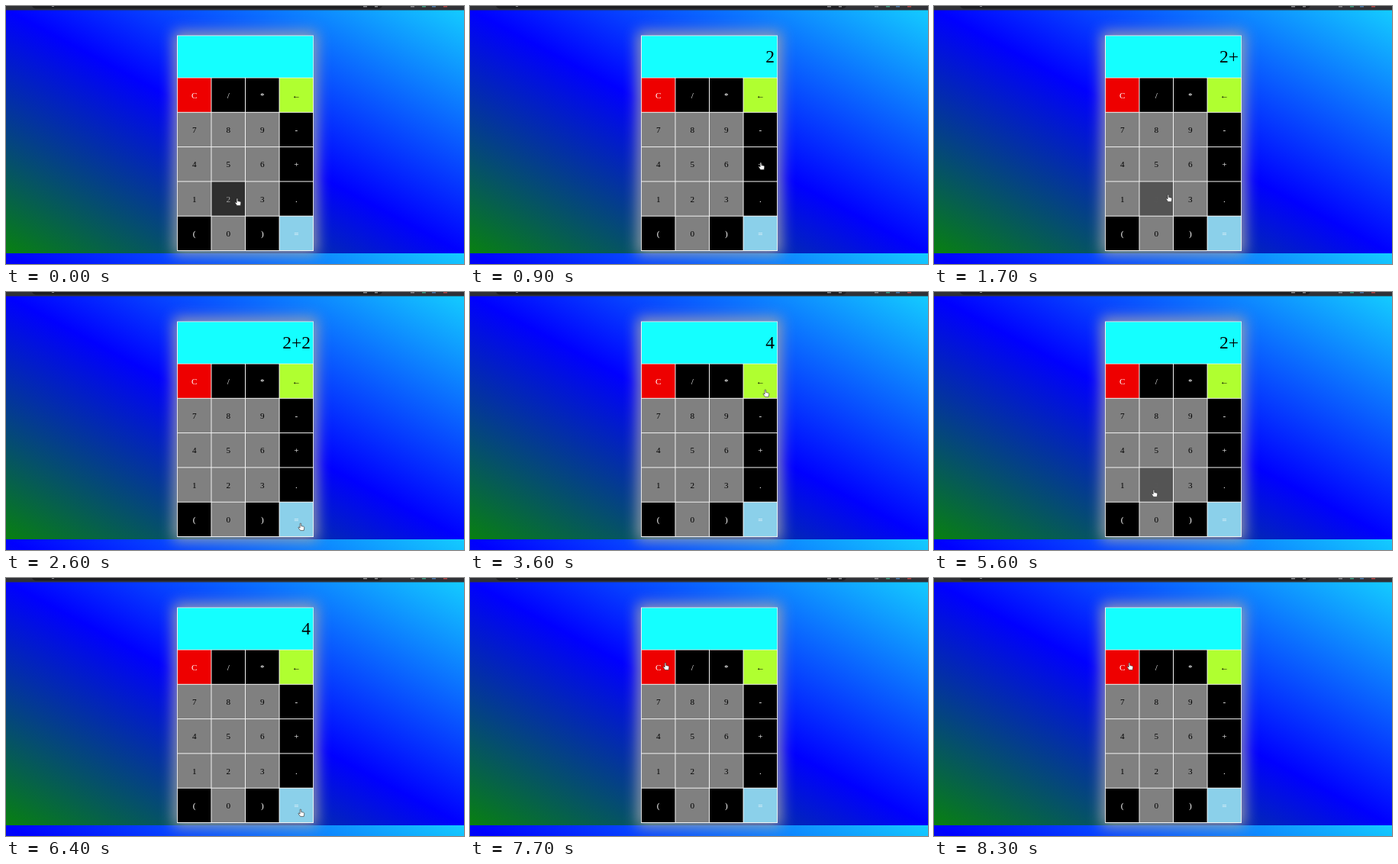
Write an HTML page that moves like this. It is 600x338 px and loops after 8400 ms.

```html
<!DOCTYPE html>
<html lang="en">
<head>
<meta charset="utf-8">
<title>Calculator</title>
<style>
html, body { margin: 0; width: 100%; height: 100%; overflow: hidden; }
svg {
  display: block; width: 600px; height: 338px;
  background: linear-gradient(to top right, #088010, #00f, #14ccff) 0 5px / 600px 319px;
}
text { font-family: "Liberation Serif", "Times New Roman", serif; }
.key { font-size: 11.2px; text-anchor: middle; }
#out { font-size: 23.5px; text-anchor: end; }
.glow { filter: blur(9px); }
</style>
</head>
<body>
<svg viewBox="0 0 600 338">
  <rect width="600" height="5.5" fill="#303136"/>
  <rect x="34" y="-8" width="459" height="11.5" rx="5" fill="#1c1d21"/>
  <g fill="#85868a">
    <rect x="60" width="3" height="1"/>
    <rect x="468" width="5" height="1.5"/>
    <rect x="483" width="4" height="1.5"/>
    <rect x="530" width="5" height="1.5"/>
  </g>
  <rect x="545" width="5" height="1.5" fill="#3a9a80"/>
  <rect x="558" width="5" height="1.5" fill="#4778a8"/>
  <rect x="573" width="5" height="1.5" fill="#b04444"/>
  <rect class="glow" x="219" y="33" width="189" height="293" fill="#a8a8a8" opacity=".85"/>
  <rect x="224" y="38.5" width="179" height="282.5" fill="#f2f2f2"/>
  <rect x="225" y="39.3" width="177.3" height="54.4" fill="#14ffff"/>
  <g id="keys"></g>
  <text id="out" x="399" y="74"></text>
  <path id="hand" fill="#fff" stroke="#222" stroke-width=".6" stroke-linejoin="round"
    d="M-1.9-4.6q.9-.8 1.6 0V-1.4l3 .6q1.2.4 1.1 1.6L3.2 4.4H-1.4L-4 .8q-.1-1.1 1-.8l1.1 1Z"/>
</svg>
<script>
const LOOP = 8400, FADE = 500;
const LABELS = ["C", "/", "*", "←", ..."789-456+123.(0)="];
const COL = 44.55, ROW = 45.3, LEFT = 224.4, TOP = 94;
const FILLS = { "C": "#ee0000", "←": "#b0ff30", "=": "#8bd0ea" };

// Cursor moves: [start, end, x, y]
const MOVES = [
  [-311, -310, 304, 257],
  [500, 900, 382, 210],
  [1300, 1580, 308, 252],
  [2100, 2450, 387, 308],
  [2950, 3400, 388, 133],
  [4100, 4500, 296, 258],
  [4750, 5050, 382, 210],
  [5280, 5520, 289, 264],
  [5900, 6220, 387, 308],
  [6850, 7300, 257, 116]
];
// Display contents: [time, text]
const SHOWN = [
  [0, ""], [300, "2"], [1100, "2+"], [1950, "2+2"], [2650, "4"], [3700, ""],
  [4650, "2"], [5200, "2+"], [5800, "2+2"], [6350, "4"], [7500, ""]
];

const $ = id => document.getElementById(id);
const add = (name, attrs) => {
  const el = document.createElementNS("http://www.w3.org/2000/svg", name);
  for (const k in attrs) el.setAttribute(k, attrs[k]);
  return $("keys").appendChild(el);
};

const keys = LABELS.map((label, i) => {
  const x = LEFT + i % 4 * COL, y = TOP + Math.floor(i / 4) * ROW;
  const digit = /\d/.test(label);
  const box = add("rect", {
    x: x + .5, y: y + .5, width: COL - 1, height: ROW - 1,
    fill: FILLS[label] || (digit ? "#807e81" : "#000")
  });
  const text = add("text", {
    class: "key", x: x + COL / 2, y: y + ROW / 2 + 4,
    fill: digit || label === "←" ? "#000" : "#fff"
  });
  text.textContent = label;
  return { x, y, digit, box, text };
});

function cursor(t) {
  let x = 257, y = 116;
  for (const [a, b, nx, ny] of MOVES) {
    if (t <= a) break;
    const u = Math.min(1, (t - a) / (b - a)), e = u * u * (3 - 2 * u);
    x += (nx - x) * e;
    y += (ny - y) * e;
  }
  return [x, y];
}

const over = (key, [x, y]) =>
  x > key.x && x < key.x + COL && y > key.y && y < key.y + ROW;

// Share of the hover fade completed; leaving a key resets it at once
function hover(key, t) {
  let age = 0;
  while (age < FADE && over(key, cursor(t - age))) age += 10;
  return age / FADE;
}

const grey = v => `rgb(${[v, v, v].map(Math.round)})`;

function draw(t) {
  const at = cursor(t);
  $("hand").setAttribute("transform", `translate(${at})`);
  $("out").textContent = SHOWN.filter(s => s[0] <= t).pop()[1];
  for (const key of keys) {
    if (!key.digit) continue;
    const p = hover(key, t);
    key.box.setAttribute("fill", grey(128 * (1 - p)));
    key.text.setAttribute("fill", grey(255 * p));
  }
}

const begin = performance.now();
function tick() {
  draw((performance.now() - begin) % LOOP);
  requestAnimationFrame(tick);
}
tick();
</script>
</body>
</html>
```
